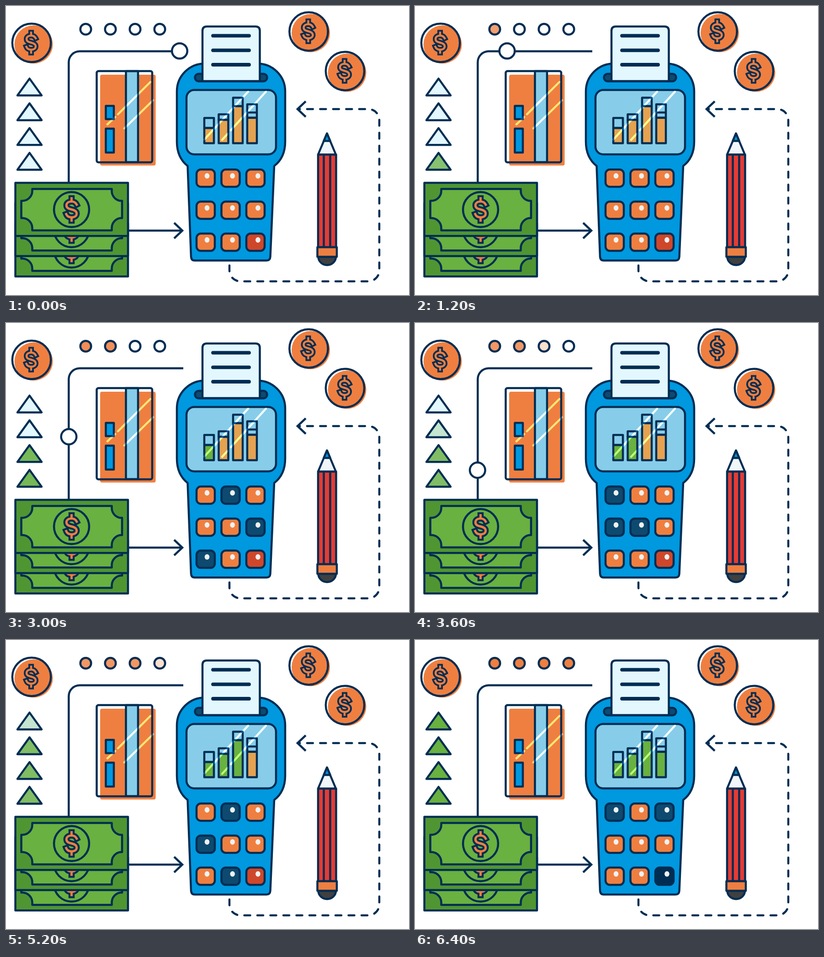
Write an HTML page that moves like this. It is 882 px wide and 635 px high and loops after 8400 ms.

```html
<!DOCTYPE html>
<html lang="en">
<head>
<meta charset="utf-8">
<title>Payment terminal</title>
<style>
  html, body { margin: 0; height: 100%; overflow: hidden; background: #fff; }
  svg { display: block; width: 100vw; height: 100vh; }
  .ink { stroke: #002d53; stroke-width: 4.5; stroke-linejoin: round; }
  .shine { stroke: #727272; stroke-width: 4.5; stroke-linecap: round; mix-blend-mode: color-dodge; }
</style>
</head>
<body>
<svg id="stage" viewBox="0 0 882 635" fill="none"></svg>
<script>
const NAVY = '#002d53', DARK = '#0e4a6f', ORANGE = '#ef7f40', BLUE = '#0098df', AMBER = '#e5a250',
      SKY = '#87cde9', PALE = '#e3f7ff', GREEN = '#69b140', RED = '#cf472a';
const LOOP = 8400, STEP = 200, BEAT = 1600;

const path = (d, fill = 'none', cls = 'ink', more = '') =>
  `<path class="${cls}" d="${d}" fill="${fill}" ${more}/>`;
const rect = (x, y, x2, y2, fill, r = 0, cls = 'ink', more = '') =>
  `<rect class="${cls}" x="${x}" y="${y}" width="${x2 - x}" height="${y2 - y}" rx="${r}" fill="${fill}" ${more}/>`;
const circle = (x, y, r, fill, cls = 'ink', more = '') =>
  `<circle class="${cls}" cx="${x}" cy="${y}" r="${r}" fill="${fill}" ${more}/>`;
const list = (n, f) => Array.from({ length: n }, (_, i) => f(i)).join('');

const DOLLAR = 'M10-9.5C8-13.5 5-15.5 0-15.5C-6-15.5-10-12.5-10-8C-10-2.5-5-1.2 0 0C5.5 1.3 10 3 10 8' +
  'C10 12.5 6 15.5 0 15.5C-5.5 15.5-9 13-10.5 9M0-22V-15.5M0 15.5V22';
const dollar = (x, y, scale) => `<g transform="translate(${x} ${y}) scale(${scale})" stroke-linecap="square">` +
  `<path d="${DOLLAR}" stroke="${NAVY}" stroke-width="12"/>` +
  `<path d="${DOLLAR}" stroke="${ORANGE}" stroke-width="4.4"/></g>`;

const coin = (x, y) => circle(x + 4.5, y + 3.5, 42, ORANGE, '') +
  circle(x, y, 42.2, 'none') + dollar(x - 1, y - .5, 1);

const bill = dy => `<g transform="translate(0 ${dy})">` +
  rect(20.5, 388.5, 267, 505.3, '#4f9632') +
  path('M57.5 402H231.5V406A22 22 0 0 0 249 428H254V466H250A22 22 0 0 0 231.5 488V493' +
       'H57.5V488A22 22 0 0 0 38 466H33.5V428H38A22 22 0 0 0 57.5 406Z', GREEN) +
  circle(143.5, 447.3, 38.5, GREEN) + dollar(143.5, 447, 1.12) + '</g>';

const triangle = i => {
  const d = `M51.5 ${159.5 + i * 54.4}l26.5 37h-53Z`;
  return path(d, PALE, '') + path(d, GREEN, 'ink', `id="tri${i}"`);
};

const card = () => rect(206, 151, 327.5, 350.5, ORANGE, 4, '') +
  rect(262.5, 143, 289, 343, SKY) +
  rect(198.5, 143, 320, 343.5, 'none', 4) +
  rect(218.5, 219.5, 236, 248.5, BLUE) + rect(218.5, 269.5, 236, 322, BLUE) +
  path('M316 167L245 238M239 244L222 260M322 207L259 269', 'none', 'shine');

// left edge, top, top of the filled part, extra divider
const BARS = [[434, 246, 268], [465.5, 238, 250], [497, 201.5, 220], [528, 216, 245.5, 234]];
const bar = ([x, top, mid, line], i) =>
  rect(x, mid, x + 21, 301.5, AMBER, 0, 'ink', `id="bar${i}"`) +
  rect(x, top, x + 21, mid, 'none') +
  (line ? path(`M${x} ${line}h21`) : '');

const key = i => {
  const c = i % 3, r = Math.floor(i / 3), x = 437 + c * 54.5, y = 378.3 + r * 70.4;
  return rect(x - 20, y - 19, x + 20, y + 19, ORANGE, 9.5, 'ink', `id="key${i}"`) +
    `<ellipse cx="${440 + c * 55.7}" cy="${y - 5}" rx="5.3" ry="6" fill="#f0f1f1"/>`;
};

const terminal = () =>
  path('M435.5 126.5H549.5A61 61 0 0 1 611 187.5V298C611 322 602 340 587 351.5L578.5 551Q578 559.3 570 559.3' +
       'H413Q405.5 559.3 405 551L397.5 351.5C383 340 374 322 374 298V187.5A61 61 0 0 1 435.5 126.5Z', BLUE) +
  rect(413.5, 149, 571.5, 165.5, DARK, 8) +
  path('M430 165V54.5Q430 45 439.5 45H546Q555.5 45 555.5 54.5V165Z', PALE) +
  `<path d="M453 65.3H532M453 97.3H532M453 129H532" stroke="${NAVY}" stroke-width="7.8" stroke-linecap="round"/>` +
  rect(395, 184.5, 591, 326, SKY, 17) +
  BARS.map(bar).join('') +
  path('M530 188L434 293.5M569 188L492 273M485 281L473 294', 'none', 'shine') +
  list(9, key);

const pencil = () =>
  path('M702.5 280L722 326.5H683Z', '#f0f6fa') +
  path('M702.5 280L709.5 296.5H695.5Z', BLUE) +
  rect(683, 326.5, 722.5, 530, '#e53b35') +
  path('M695.5 326V530M709.5 326V530') +
  path('M683.5 551A19 18 0 0 0 722 551Z', '#404040') +
  rect(681.5, 530, 724, 551, ORANGE);

const DOT_X = [174.5, 228.5, 282.5, 336.5];
stage.innerHTML =
  coin(56, 81) + coin(662.5, 56) + coin(742, 143) +
  DOT_X.map((x, i) => circle(x, 51, 11.8, ORANGE, 'ink', `id="dot${i}"`)).join('') +
  list(4, triangle) +
  path('M137.3 390V123.5A24 24 0 0 1 161.3 99.5H388') +
  circle(0, 0, 16.8, '#fff', 'ink', 'id="ball"') +
  bill(89) + bill(44.2) + bill(0) +
  path('M268 493.5H386') + path('M368 476.5L386 493.5L368 510.5', 'none', 'ink', 'style="stroke-linejoin:miter"') +
  card() + terminal() + pencil() +
  path('M489 570V581A24 24 0 0 0 513 605H793A24 24 0 0 0 817 581V250.5A24 24 0 0 0 793 226.5H640',
       'none', 'ink', 'stroke-dasharray="13 15.5" stroke-linecap="round"') +
  path('M656 209.5L638 226.5L656 243.5', 'none', 'ink', 'style="stroke-linejoin:miter"');

const el = id => document.getElementById(id);
const BALL = [[380, 98.7], [142, 98.7], [136.8, 271.5], [136.8, 479], [136.8, 479]];
const PRESSED = [[], [1, 5, 6], [0, 3, 4], [1, 3, 7], [0, 2, 8]];

function keyFill(i, down) {
  if (i === 8) return down ? NAVY : RED;
  return down ? DARK : ORANGE;
}

function draw(now) {
  const t = Math.min(Math.floor(now % LOOP / STEP) * STEP, 4 * BEAT);
  const beat = Math.floor(t / BEAT), p = t / BEAT - beat;

  const from = BALL[beat], to = BALL[Math.min(beat + 1, 4)];
  const [x, y] = from.map((v, i) => v + (to[i] - v) * p);
  el('ball').setAttribute('transform', `translate(${x} ${y})`);

  for (let i = 0; i < 4; i++) {
    // lit parts cross-dissolve from one beat to the next
    const alpha = i < beat ? 1 - p * (1 - p) : i === beat ? p : 0;
    el('dot' + i).setAttribute('fill-opacity', alpha);
    el('tri' + (3 - i)).setAttribute('fill-opacity', alpha);
    el('bar' + i).setAttribute('fill', i < beat ? GREEN : AMBER);
  }
  for (let i = 0; i < 9; i++) el('key' + i).setAttribute('fill', keyFill(i, PRESSED[beat].includes(i)));
}

let start;
function tick(now) {
  start ??= now;
  draw(now - start);
  requestAnimationFrame(tick);
}
draw(0);
requestAnimationFrame(tick);
</script>
</body>
</html>
```
